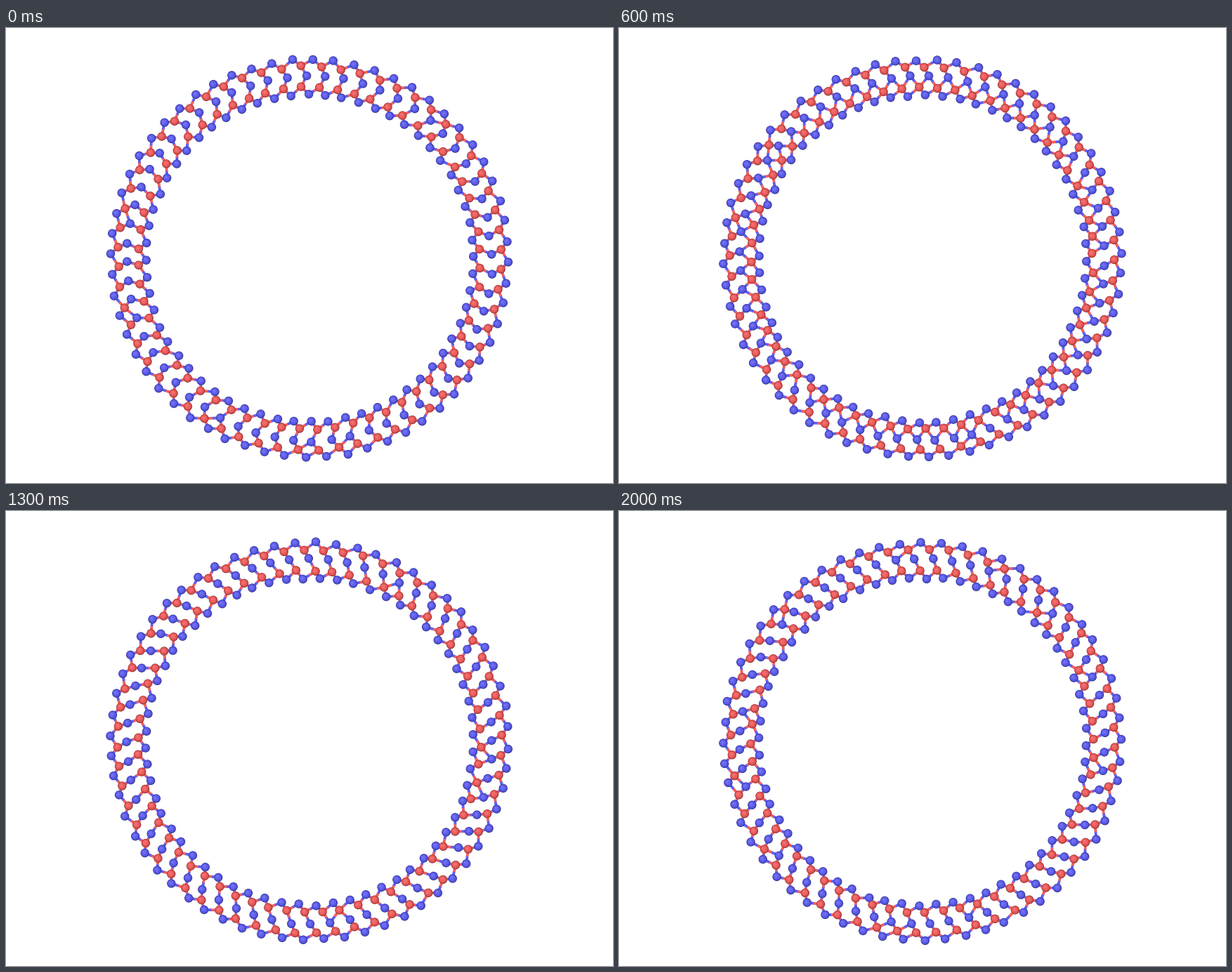
Recreate the animation shown at these times as a matplotlib script. Size 864x648 px, loop 2.1 s.

```python
import numpy as np
import matplotlib.pyplot as plt
from matplotlib.animation import FuncAnimation
from matplotlib.collections import LineCollection

W, H = 864, 648
FRAMES, STEP = 21, 100
N = 60                      # cells around the ring
CX, CY, RADIUS = 432, 328, 283
CUTOFF = 23                 # longest cross bond in px

BLUE, RED = np.array([92, 92, 240]) / 255, np.array([240, 90, 90]) / 255


def outer_turn(u):
    """Clockwise rotation of the outer chain, in cells."""
    return .18 + 1.82 * u


def inner_turn(u):
    """The inner chain lags behind, then catches up."""
    return -.1 + .75 * u + .66 * u ** 2


# Rows from outside in: rotation, shift in cells, depth in px
ROWS = [(outer_turn, 0, 0), (outer_turn, .39, 10), (outer_turn, .65, 23),
        (inner_turn, .655, 39.5), (inner_turn, 0, 50)]
COLORS = np.repeat([BLUE, RED, BLUE, RED, BLUE], N, axis=0)

# Thermal sway: every atom oscillates a little, in whole cycles per loop
rng = np.random.default_rng(4)
shape = (len(ROWS), N, 2)
SWAY = rng.normal(0, 1, shape)
SWAY_RATE = rng.integers(2, 6, shape)
SWAY_PHASE = rng.uniform(0, 2 * np.pi, shape)


def atom_rows(u):
    rows = []
    for turn, shift, depth in ROWS:
        angle = (np.arange(N) + shift + turn(u)) * 2 * np.pi / N
        r = RADIUS - depth
        rows.append(np.column_stack([CX + r * np.sin(angle),
                                     CY - r * np.cos(angle)]))
    return np.array(rows) + SWAY * np.sin(2 * np.pi * SWAY_RATE * u + SWAY_PHASE)


def cross_bonds(blue, red):
    gap = np.linalg.norm(blue[:, None] - red[None], axis=2)
    i, j = np.nonzero(gap < CUTOFF)
    return blue[i], red[j]


def half_bonds(rows):
    top, red_out, mid, red_in, low = rows
    pairs = [(top, red_out), (np.roll(top, -1, axis=0), red_out),
             (low, red_in), (np.roll(low, -1, axis=0), red_in),
             cross_bonds(mid, red_out), cross_bonds(mid, red_in)]
    blue = np.concatenate([p[0] for p in pairs])
    red = np.concatenate([p[1] for p in pairs])
    centre = (blue + red) / 2
    return np.stack([blue, centre], axis=1), np.stack([red, centre], axis=1)


fig = plt.figure(figsize=(W / 72, H / 72), dpi=72, facecolor="white")
ax = fig.add_axes([0, 0, 1, 1])
ax.set(xlim=(0, W), ylim=(H, 0))
ax.axis("off")

bonds = []
for width, shade in [(3.8, .94), (2.4, 1.05)]:
    for side, color in enumerate([BLUE, RED]):
        lines = LineCollection([], linewidths=width, capstyle="butt",
                               colors=[np.clip(color * shade, 0, 1)], zorder=1)
        ax.add_collection(lines)
        bonds.append((lines, side))

# Shaded balls: diameter, brightness, lift towards white, light offset
balls = []
for size, shade, lift, off in [(12.4, .62, 0, 0), (11, .84, 0, -.2),
                               (9.4, .97, 0, -.4), (6.4, 1, .07, -.8),
                               (3.2, 1, .14, -1.2)]:
    tint = COLORS * shade
    tint = tint + (1 - tint) * lift
    dots = ax.scatter(np.zeros(len(tint)), np.zeros(len(tint)), s=size ** 2,
                      c=tint, linewidths=0, zorder=2)
    balls.append((dots, off))


def draw(frame):
    rows = atom_rows(frame / FRAMES)
    halves = half_bonds(rows)
    for lines, side in bonds:
        lines.set_segments(halves[side])
    for dots, off in balls:
        dots.set_offsets(rows.reshape(-1, 2) + off)
    return [artist for artist, _ in bonds + balls]


anim = FuncAnimation(fig, draw, frames=FRAMES, interval=STEP, repeat=True)
plt.show()
```
